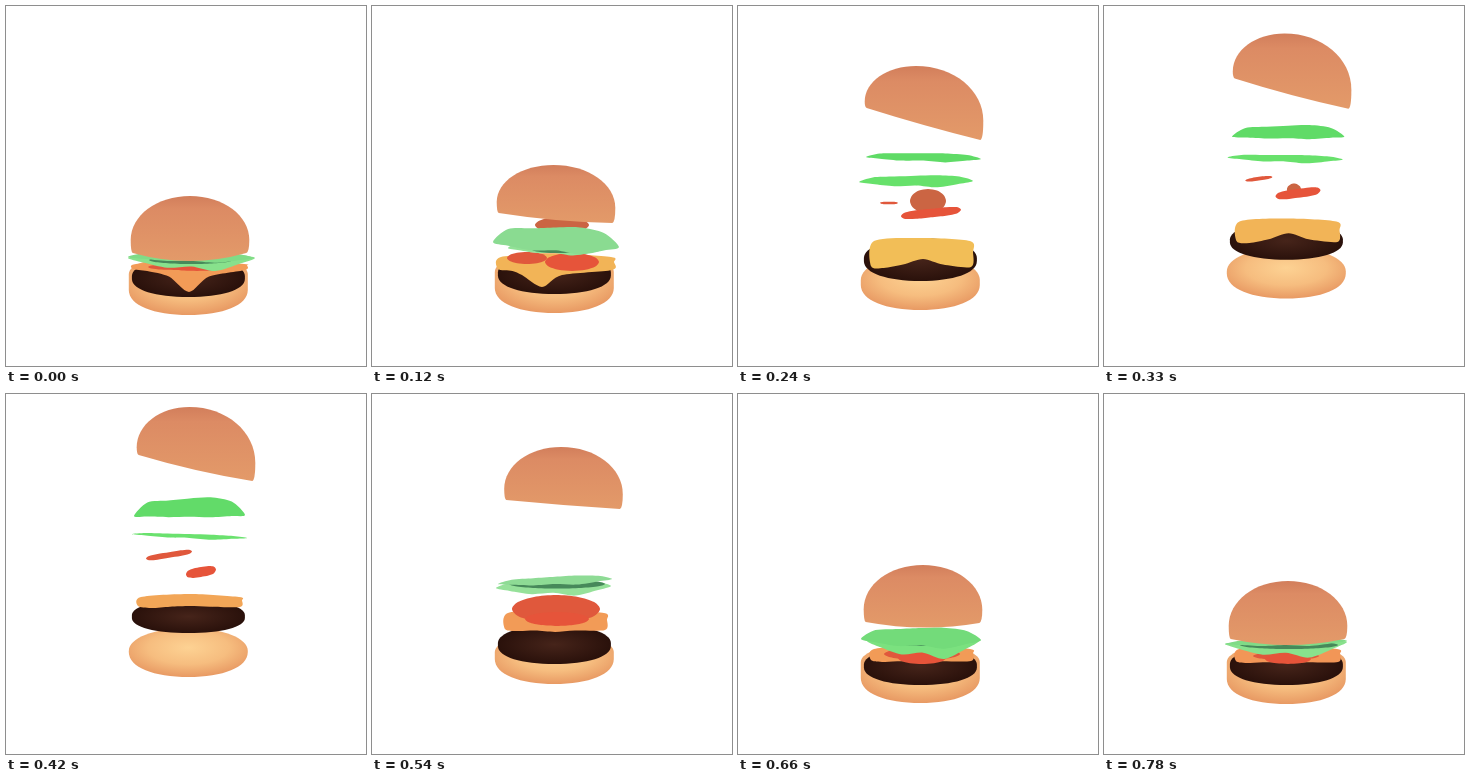
Write an HTML page that moves like this. It is 360 px wide and 360 px high and loops after 0.81 s.

```html
<!DOCTYPE html>
<html lang="en">
<head>
<meta charset="utf-8">
<title>Bouncing burger</title>
<style>
html, body { margin: 0; width: 100%; height: 100%; overflow: hidden; background: #fff; }
svg { display: block; width: 100%; height: 100%; }
</style>
</head>
<body>
<svg id="stage" viewBox="0 0 360 360" xmlns="http://www.w3.org/2000/svg">
  <defs>
    <linearGradient id="crown" x1="0" y1="0" x2="0" y2="1">
      <stop offset="0" stop-color="#d27e5b"/>
      <stop offset=".2" stop-color="#dc8b64"/>
      <stop offset="1" stop-color="#e39a69"/>
    </linearGradient>
    <radialGradient id="heel" cx=".5" cy=".4" r=".62">
      <stop offset="0" stop-color="#fdd293"/>
      <stop offset=".55" stop-color="#f6bd7f"/>
      <stop offset="1" stop-color="#e79761"/>
    </radialGradient>
    <radialGradient id="meat">
      <stop offset="0" stop-color="#46241a"/>
      <stop offset="1" stop-color="#2a110b"/>
    </radialGradient>
  </defs>
</svg>
<script>
const LOOP = 810, STEP = 30;
const TIMES = [0, 120, 240, 420, 540, 660, 780];
const N = TIMES.length;
const stage = document.getElementById('stage');

const timeAt = i => TIMES[(i + N) % N] + LOOP * Math.floor(i / N);
const valAt = (rows, i, j) => rows[(i + N) % N][j];

// Monotone cubic interpolation, periodic over the loop
function slope(rows, i, j) {
  const v = valAt(rows, i, j);
  const a = (v - valAt(rows, i - 1, j)) / (timeAt(i) - timeAt(i - 1));
  const b = (valAt(rows, i + 1, j) - v) / (timeAt(i + 1) - timeAt(i));
  return a * b <= 0 ? 0 : 2 * a * b / (a + b);
}

function pose(rows, t) {
  let i = N - 1;
  while (TIMES[i] > t) i--;
  const h = timeAt(i + 1) - timeAt(i), u = (t - timeAt(i)) / h;
  const ease = u * u * (3 - 2 * u), v = 1 - u;
  return rows[0].map((_, j) => {
    const a = valAt(rows, i, j), b = valAt(rows, i + 1, j);
    return a + (b - a) * ease +
      h * u * v * (v * slope(rows, i, j) - u * slope(rows, i + 1, j));
  });
}

const fmt = (s, ...v) => s + v.map(n => n.toFixed(2)).join(' ');

// Closed smooth curve through points
function blob(pts) {
  const n = pts.length, k = 0.14;
  const at = i => pts[(i + n) % n];
  const parts = pts.map((b, i) => {
    const a = at(i - 1), c = at(i + 1), e = at(i + 2);
    return fmt('C', b[0] + (c[0] - a[0]) * k, b[1] + (c[1] - a[1]) * k,
      c[0] - (e[0] - b[0]) * k, c[1] - (e[1] - b[1]) * k, c[0], c[1]);
  });
  return fmt('M', ...pts[0]) + parts.join('') + 'Z';
}

// centre x, top, rim height, tilt, belly
function dome([x, top, rim, tilt, belly]) {
  const k = 0.56, l = x - 59.3, r = x + 59.3, tx = x - tilt / 2;
  const bl = rim - tilt, br = rim + tilt;
  const ly = bl - 13 + tilt * 0.4, ry = br - 13 - tilt * 0.4;
  return fmt('M', l, ly) +
    fmt('C', l, ly - (ly - top) * k, tx - (tx - l) * k, top, tx, top) +
    fmt('C', tx + (r - tx) * k, top, r, ry - (ry - top) * k, r, ry) +
    fmt('Q', r, br - 1, r - 3, br) +
    fmt('Q', x, rim + 2 * belly, l + 2, bl) +
    fmt('Q', l, bl - 1, l, ly) + 'Z';
}

function pill(x, rx, top, a, b, bot) {
  const l = x - rx, r = x + rx, w = rx * 0.58;
  const up = a + (top - a) * 0.56, down = b + (bot - b) * 0.62;
  return fmt('M', l, a) + fmt('C', l, up, x - w, top, x, top) +
    fmt('C', x + w, top, r, up, r, a) + fmt('L', r, b) +
    fmt('C', r, down, x + w, bot, x, bot) +
    fmt('C', x - w, bot, l, down, l, b) + 'Z';
}

const heel = ([top, side, bot]) => pill(182.3, 59.5, top, side, bot - 25, bot);

function patty([top, bot]) {
  const m = (top + bot) / 2;
  return pill(182.4, 56.5, top, m - 1.5, m + 1.5, bot);
}

// half width, top, side bottom, corner x, corner y
function cheese([w, top, bot, cx, cy]) {
  const x = 184, hang = bot + (cy - bot) * 0.3;
  return blob([
    [x - w + 3, top + 3], [x, top], [x + w - 3, top + 3],
    [x + w, (top + bot) / 2], [x + w - 2, bot], [cx + 20, hang], [cx, cy],
    [cx - 20, hang], [x - w * 0.75, bot + 1], [x - w, bot - 1]
  ]);
}

// centre, radii, bend (slanted with a narrow waist)
function slice([x, y, rx, ry, bend]) {
  const n = 12;
  return blob(Array.from({ length: n }, (_, i) => {
    const a = i / n * 2 * Math.PI, c = Math.cos(a);
    const thin = 1 - bend * 0.5 * (1 - c * c);
    return [x + rx * c, y + ry * Math.sin(a) * thin - bend * 4 * c];
  }));
}

const inner = x => ([y, rx, ry]) =>
  rx < 0.5 ? '' : slice([x, y, rx, Math.max(ry, 0), 0]);

// left tip, right tip, rise above, droop below
const RISE = [0.75, 0.85, 0.95, 1, 0.75], DROOP = [0.45, 1, 0.65, 0.75, 0.35];
function leaf([x0, y0, x1, y1, up, down]) {
  const at = (s, dy) => [x0 + (x1 - x0) * s, y0 + (y1 - y0) * s + dy];
  const pos = i => 0.12 + i * 0.19;
  return blob([
    at(0, 0), ...RISE.map((m, i) => at(pos(i), -up * m)), at(1, 0),
    ...DROOP.map((m, i) => at(1 - pos(i), down * m))
  ]);
}

const layers = [];
function layer(shape, fill, rows) {
  const el = document.createElementNS(stage.namespaceURI, 'path');
  stage.append(el);
  layers.push({ el, shape, fill, rows });
}

// Cheese green channel and lettuce red channel
const tints = [
  [155, 128], [180, 138], [190, 95], [166, 98], [155, 142], [155, 115], [150, 128]
];
const gold = ([g]) => `rgb(242 ${g} 87)`;
const pale = ([, r]) => `rgb(${r + 8} 225 ${r + 12})`;
const green = ([, r]) => `rgb(${r} 219 ${r + 7})`;

layer(heel, 'url(#heel)', [
  [250, 268, 309], [246, 266, 307], [249, 274, 304], [234, 257, 283],
  [240, 258, 290], [250, 268, 309], [250, 268, 310]
]);
layer(patty, 'url(#meat)', [
  [252, 291], [248, 288], [232, 275], [206, 239], [231, 270], [253, 291], [252, 291]
]);
layer(cheese, gold, [
  [57, 255, 264, 183, 286], [58, 248, 264, 170, 281], [51, 232, 261, 185, 253],
  [52, 200, 213, 184, 212], [51, 216, 236, 183, 238], [51, 252, 267, 183, 268],
  [52, 252, 268, 183, 269]
]);

// Rear filling
layer(inner(190), '#cb6543', [
  [242, 26, 6], [219, 27, 8], [195, 18, 12], [178, 0, 0],
  [210, 0, 0], [240, 24, 5], [242, 26, 6]
]);

// Tomatoes
layer(slice, '#e0583c', [
  [168, 261, 26, 3, 0], [155, 252, 20, 6, 0], [151, 197, 9, 1.3, 0],
  [163, 161, 23, 5, 0.9], [184, 215, 44, 14, 0], [184, 260, 38, 6, 0],
  [182, 262, 33, 4, 0]
]);
layer(slice, '#e6543a', [
  [191, 262, 26, 3, 0], [200, 256, 27, 9, 0], [193, 207, 30, 7, 0.8],
  [195, 178, 15, 7, 0.6], [185, 225, 32, 7, 0], [184, 264, 24, 6, 0],
  [184, 265, 23, 5, 0]
]);

// Lettuce, with the shade between the two leaves
layer(leaf, pale, [
  [122, 252, 249, 252, 4, 13], [136, 242, 230, 244, 8, 6],
  [121, 176, 235, 175, 6, 6], [126, 140, 241, 144, 2, 3],
  [124, 194, 239, 192, 6, 9], [129, 247, 241, 247, 3, 18],
  [121, 250, 243, 248, 2, 15]
]);
layer(inner(185), '#47895a', [
  [254, 42, 4], [243, 26, 4], [160, 0, 0], [130, 0, 0],
  [190, 48, 4.5], [249, 36, 3], [251, 49, 4]
]);
layer(leaf, green, [
  [122, 251, 248, 252, 5, 5], [121, 236, 247, 241, 18, 9],
  [128, 151, 243, 153, 5, 4], [128, 122, 239, 121, 18, 2],
  [126, 190, 240, 185, 5, 4], [123, 245, 243, 246, 12, 9],
  [121, 250, 243, 247, 4, 4]
]);

layer(dome, 'url(#crown)', [
  [184, 190, 247, 0, 8], [184, 159, 212, 5, 2], [186, 60, 118, 16, 1],
  [190, 13, 74, 13, 2], [191.5, 53, 110.5, 4.5, 0.5],
  [185, 171, 228.5, 0.5, 5], [184, 187, 245, 0, 6]
]);

function draw(t) {
  const tint = pose(tints, t).map(Math.round);
  for (const { el, shape, fill, rows } of layers) {
    el.setAttribute('d', shape(pose(rows, t)));
    el.setAttribute('fill', typeof fill === 'string' ? fill : fill(tint));
  }
}

const start = performance.now();
function tick(now) {
  const t = Math.max(0, now - start) % LOOP;
  draw(Math.floor(t / STEP) * STEP);
  requestAnimationFrame(tick);
}
draw(0);
requestAnimationFrame(tick);
</script>
</body>
</html>
```
